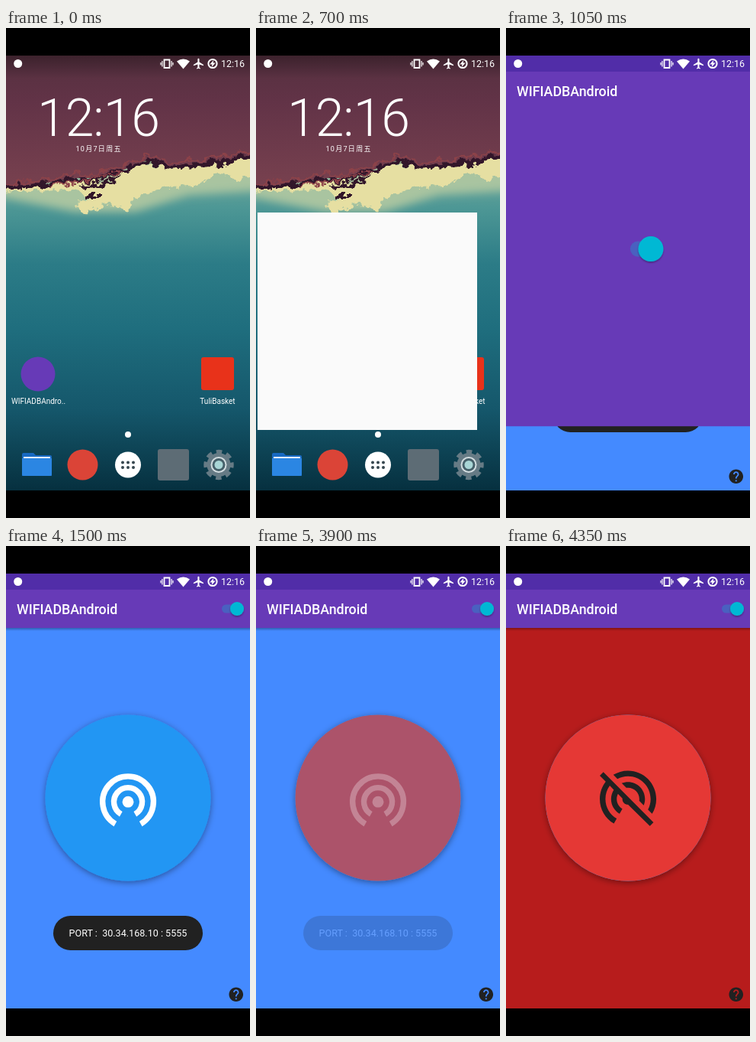
These frames come from a looping animation (320x640 px, 8 s). An HTML page:

```html
<!DOCTYPE html>
<html lang="en">
<head>
<meta charset="utf-8">
<title>WIFIADBAndroid</title>
<style>
  html, body { margin: 0; width: 100%; height: 100%; overflow: hidden; background: #000; }
  svg { display: block; width: 100%; height: 100%; font-family: Roboto, "Noto Sans CJK SC", "Noto Sans CJK", sans-serif; }
  text { white-space: pre; }
  #home text { text-anchor: middle; }
</style>
</head>
<body>
<svg viewBox="0 0 320 640">
  <defs>
    <linearGradient id="sea" x2="0" y2="1">
      <stop offset="0" stop-color="#73aa9c"/>
      <stop offset=".13" stop-color="#4d9795"/>
      <stop offset=".3" stop-color="#2c7c87"/>
      <stop offset=".5" stop-color="#1f6e7e"/>
      <stop offset=".75" stop-color="#15576b"/>
      <stop offset="1" stop-color="#06303f"/>
    </linearGradient>
    <linearGradient id="land" x2="0" y2="1">
      <stop offset="0" stop-color="#55303f"/>
      <stop offset=".35" stop-color="#623347"/>
      <stop offset="1" stop-color="#78414f"/>
    </linearGradient>
    <linearGradient id="shade" x2="0" y2="1">
      <stop offset="0" stop-opacity=".3"/>
      <stop offset="1" stop-opacity="0"/>
    </linearGradient>
    <filter id="soft" x="-10%" y="-30%" width="120%" height="160%"><feGaussianBlur stdDeviation="6"/></filter>
    <filter id="rough" filterUnits="userSpaceOnUse" x="-20" y="140" width="360" height="120">
      <feTurbulence type="fractalNoise" baseFrequency=".09" numOctaves="3" seed="4"/>
      <feDisplacementMap in="SourceGraphic" scale="17" xChannelSelector="R" yChannelSelector="G"/>
    </filter>
    <filter id="lift" x="-20%" y="-20%" width="140%" height="140%">
      <feDropShadow dx="0" dy="2" stdDeviation="4" flood-opacity=".4"/>
    </filter>
    <filter id="low" x="-40%" y="-40%" width="180%" height="180%">
      <feDropShadow dx="0" dy="1.5" stdDeviation="1.2" flood-opacity=".35"/>
    </filter>
    <clipPath id="screen"><path d="M0 36H320V604H0z"/></clipPath>
  </defs>
  <rect width="320" height="640"/>

  <g clip-path="url(#screen)">
    <g id="home">
      <rect y="180" width="320" height="424" fill="url(#sea)"/>
      <path d="M-20 205L100 195 190 170 340 165V212L240 218 170 240 90 240 -20 218z" fill="#a9c4a0" filter="url(#soft)"/>
      <path d="M0 36H320V168L285 174 250 180 215 183 187 172 150 187 115 196 88 196 40 205 0 208z" fill="url(#land)"/>
      <g filter="url(#rough)">
        <path d="M-20 210L90 198 130 200 180 176 215 186 340 166V192L300 197 280 190 245 207 215 208 185 214 168 222 160 240 138 230 98 241 92 230 112 222 88 211 40 214 -20 213z" fill="#e6dfa2"/>
        <path d="M-20 209L45 205 88 197 116 199 152 187 187 173 213 183 250 180 286 174 340 162" fill="none" stroke="#31152a" stroke-width="6"/>
        <path d="M-20 204L45 199 90 190 115 192 150 180 186 166 214 176 250 173 340 157M60 205L115 197 150 189" fill="none" stroke="#8c4248" stroke-width="2.5"/>
        <path d="M100 207L125 204 152 194M104 220H124" fill="none" stroke="#31152a" stroke-width="4"/>
      </g>
      <rect y="36" width="320" height="30" fill="url(#shade)"/>
      <g fill="#fff">
        <text x="121" y="141" font-size="68" font-weight="300" letter-spacing="-1">12:16</text>
        <text x="121.6" y="161" font-size="9" letter-spacing="1.3">10月7日周五</text>
        <text x="42.5" y="490.5" font-size="10">WIFIADBAndro..</text>
        <text x="277.5" y="490.5" font-size="10">TuliBasket</text>
        <circle cx="160" cy="531" r="4"/>
        <circle cx="160" cy="570.5" r="17"/>
      </g>
      <circle cx="42" cy="452" r="22.5" fill="#673ab7"/>
      <rect x="256" y="430" width="43" height="43" rx="3" fill="#e8321a"/>
      <path d="M23 555H36L39 558H58Q60 558 60 560V585H21V557Q21 555 23 555z" fill="#1769c2"/>
      <path d="M23 560H58V564H23z" fill="#e8f1fa"/>
      <path d="M21 562H60V583Q60 585 58 585H23Q21 585 21 583z" fill="#2b86e3"/>
      <circle cx="100.5" cy="570.5" r="20" fill="#db4437"/>
      <path d="M153 567.5h.01m6.99 0h.01m6.99 0h.01M153 574h.01m6.99 0h.01m6.99 0h.01" stroke="#37474f" stroke-width="4" stroke-linecap="round"/>
      <rect x="199" y="550" width="41" height="41" rx="3" fill="#5d6c75"/>
      <g transform="translate(279 570.5)">
        <circle r="16.7" fill="none" stroke="#667b85" stroke-width="6" stroke-dasharray="7.3 5.817" stroke-dashoffset="3.65"/>
        <circle r="15.5" fill="#667b85"/>
        <circle r="10.5" fill="#d3dde0"/>
        <circle r="8.5" fill="#47616b"/>
        <circle r="5.5" fill="#a9d6d6"/>
      </g>
    </g>

    <rect id="sheet" fill="#fafafa"/>

    <g id="app">
      <rect y="57" width="320" height="547" fill="#448aff"/>
      <g id="pill">
        <rect x="62" y="483" width="196" height="45" rx="22.5" fill="#212121"/>
        <text x="160" y="510.3" font-size="12.6" text-anchor="middle" fill="#fff">PORT :  30.34.168.10 : 5555</text>
      </g>
      <circle id="flood" cx="160" cy="330" fill="#b71c1c"/>
      <g filter="url(#lift)">
        <circle cx="160" cy="329" r="108.5" fill="#2196f3"/>
        <circle id="hot" cx="160" cy="329" r="108.5" fill="#e53935"/>
      </g>
      <g transform="translate(115.6 286) scale(3.704)">
        <g id="on">
          <path d="M7.5 20.8A9 9 0 1 1 16.5 20.8M9.5 17.33A5 5 0 1 1 14.5 17.33" fill="none" stroke="#fff" stroke-width="2"/>
          <circle cx="12" cy="13" r="2" fill="#fff"/>
        </g>
        <path id="off" fill="#212121" d="M17.56 14.24c.28-.69.44-1.45.44-2.24 0-3.31-2.69-6-6-6-.79 0-1.55.16-2.24.44l1.62 1.62c.2-.03.41-.06.62-.06 2.21 0 4 1.79 4 4 0 .21-.02.42-.05.63l1.61 1.61zM12 4c4.42 0 8 3.58 8 8 0 1.35-.35 2.62-.95 3.74l1.47 1.47C21.46 15.69 22 13.91 22 12c0-5.52-4.48-10-10-10-1.91 0-3.69.55-5.21 1.47l1.46 1.46C9.37 4.34 10.65 4 12 4zM3.27 2.5L2 3.77l2.1 2.1C2.79 7.57 2 9.69 2 12c0 3.7 2.01 6.92 4.99 8.65l1-1.73C5.61 17.53 4 14.96 4 12c0-1.76.57-3.38 1.53-4.69l1.43 1.44C6.36 9.68 6 10.8 6 12c0 2.22 1.21 4.15 3 5.19l1-1.74c-1.19-.7-2-1.97-2-3.45 0-.65.17-1.25.44-1.79l1.58 1.58L10 12c0 1.1.9 2 2 2l7.73 7.5L21 20.23z"/>
      </g>
      <path transform="translate(290.6 574.6) scale(.93)" fill="#212121" d="M12 2C6.48 2 2 6.48 2 12s4.48 10 10 10 10-4.48 10-10S17.52 2 12 2zm1 17h-2v-2h2v2zm2.07-7.75l-.9.92C13.45 12.9 13 13.5 13 15h-2v-.5c0-1.1.45-2.1 1.17-2.83l1.24-1.26c.37-.36.59-.86.59-1.41 0-1.1-.9-2-2-2s-2 .9-2 2H8c0-2.21 1.79-4 4-4s4 1.79 4 4c0 .88-.36 1.68-.93 2.25z"/>
      <rect id="edge" width="320" height="4" fill="url(#shade)"/>
      <rect id="bar" y="57" width="320" fill="#673ab7"/>
      <rect y="36" width="320" height="21" fill="#512da8"/>
      <text x="14" y="89" font-size="17.8" font-weight="500" fill="#fff">WIFIADBAndroid</text>
      <line id="track" stroke="#4a60c0" stroke-linecap="round"/>
      <circle id="thumb" fill="#00b8d4" filter="url(#low)"/>
    </g>

    <g fill="#fff">
      <circle cx="15.7" cy="46.5" r="5.5"/>
      <path d="M207.5 41.5H214.5V52H207.5z" fill="none" stroke="#fff" stroke-width="1.8"/>
      <path d="M204.9 43V50.5M217.1 43V50.5M203 45V48.5M219 45V48.5" stroke="#fff" stroke-width="1.2"/>
      <path d="M224 43.5Q232.5 37.5 241 43.5L232.5 53.5z"/>
      <path transform="translate(244.5 38.3) scale(.69)" d="M21 16v-2l-8-5V3.5c0-.83-.67-1.5-1.5-1.5S10 2.67 10 3.5V9l-8 5v2l8-2.5V19l-2 1.5V22l3.5-1 3.5 1v-1.5L13 19v-5.5l8 2.5z"/>
      <circle cx="271" cy="46.5" r="5.6" fill="none" stroke="#fff" stroke-width="2"/>
      <path d="M272.4 41.8L267.3 47.4H270.4L269.6 51.2 274.7 45.6H271.6z"/>
      <text x="313" y="51" font-size="12.44" text-anchor="end">12:16</text>
    </g>
  </g>
</svg>
<script>
const LOOP = 8000, STEP = 50;
const el = id => document.getElementById(id);
const set = (id, attrs) => { for (const k in attrs) el(id).setAttribute(k, attrs[k]); };
const mix = (a, b, p) => a + (b - a) * p;
const ramp = (t, start, end) => Math.min(1, Math.max(0, (t - start) / (end - start)));
const ease = x => (1 - Math.cos(Math.PI * x)) / 2;
const show = (id, on) => set(id, { display: on ? 'inline' : 'none' });

// The window opens out of the tapped icon, faster sideways than up and down.
function openWindow(t) {
  const x = ramp(t, 532, 868), wide = 1 - (1 - x) ** 3, tall = ease(x);
  const left = mix(16, 0, wide), top = mix(446, 36, tall);
  set('sheet', {
    x: left, y: top,
    width: mix(80, 320, wide) - left,
    height: mix(446, 604, tall) - top
  });
  show('sheet', x > 0);
  show('home', t < 900);
  show('app', t >= 900);
}

// The toolbar folds up and carries the switch to its right end.
function foldBar(t) {
  const x = ramp(t, 925, 1490), p = (x + ease(x)) / 2;
  const bottom = mix(604, 107, p), cy = (57 + bottom) / 2;
  const scale = 2 - p, r = 5.5 * scale, cx = mix(167, 303, p);
  set('bar', { height: bottom - 57 });
  set('edge', { y: bottom, opacity: p * p });
  set('track', { x1: mix(138.5, 283, p) + r, x2: cx, y1: cy, y2: cy, 'stroke-width': 2 * r });
  set('thumb', { cx, cy, r: 9 * scale });
}

function turnOff(t) {
  set('pill', { opacity: 1 - ramp(t, 3650, 3950) });
  set('flood', { r: 320 * ease(ramp(t, 3755, 4255)) });
  set('hot', { opacity: ramp(t, 3650, 4000) });
  set('on', { opacity: 1 - ramp(t, 3650, 4000) });
  set('off', { opacity: ramp(t, 4040, 4350) });
}

let begin;
function draw(now) {
  begin ??= now;
  const t = Math.floor((now - begin) % LOOP / STEP) * STEP;
  openWindow(t);
  foldBar(t);
  turnOff(t);
  requestAnimationFrame(draw);
}
draw(performance.now());
</script>
</body>
</html>
```
